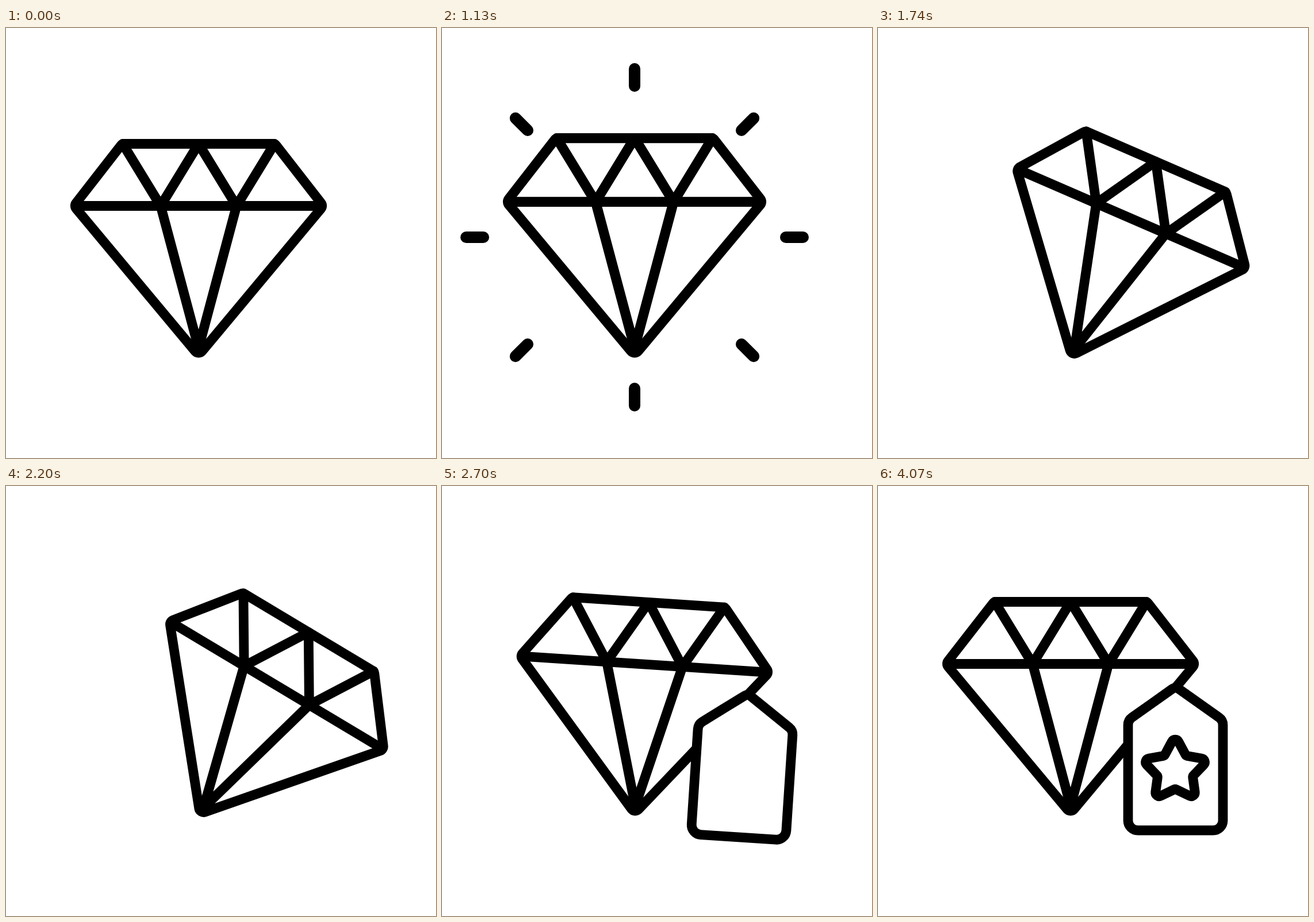
These frames come from a looping animation (748 by 748 pixels, 7600 ms). An HTML page with a canvas:

```html
<!DOCTYPE html>
<html lang="en">
<head>
<meta charset="utf-8">
<title>Diamond and tag</title>
<style>
  html, body { margin: 0; height: 100%; overflow: hidden; background: #fff; }
  canvas { display: block; width: 100vw; height: 100vh; }
</style>
</head>
<body>
<canvas width="748" height="748"></canvas>
<script>
const ctx = document.querySelector('canvas').getContext('2d');
const LOOP = 7600, FPS = 30, LINE = 16.8;
const PIVOT = [335, 574];
const SPARK_CENTER = [335, 364];
const SPARK_OFFSETS = [4, 4, -4, 0, -10, 2, 1, -2]; // clockwise from the right
const STAR_CENTER = [517, 495];

const clamp = x => Math.min(1, Math.max(0, x));
const progress = (t, start, end) => clamp((t - start) / (end - start));

// Steep ease in and out: cubic-bezier(.84, 0, .15, 1)
function ease(x) {
  let low = 0, high = 1;
  for (let i = 0; i < 24; i++) {
    const u = (low + high) / 2, v = 1 - u;
    if (3 * u * v * v * 0.84 + 3 * u * u * v * 0.15 + u ** 3 < x) low = u;
    else high = u;
  }
  return low * low * (3 - 2 * low);
}
const eased = (t, start, end) => ease(progress(t, start, end));

// Closed polygon from [x, y, corner radius] points
function roundedPolygon(points) {
  const [first, last] = [points[0], points.at(-1)];
  ctx.beginPath();
  ctx.moveTo((first[0] + last[0]) / 2, (first[1] + last[1]) / 2);
  points.forEach(([x, y, r], i) => {
    const next = points[(i + 1) % points.length];
    const end = i === points.length - 1
      ? [(x + next[0]) / 2, (y + next[1]) / 2] : next;
    ctx.arcTo(x, y, end[0], end[1], r);
  });
  ctx.closePath();
}

function polyline(...points) {
  ctx.beginPath();
  points.forEach(([x, y]) => ctx.lineTo(x, y));
  ctx.stroke();
}

function drawDiamond() {
  const top = 201.5, girdle = 309.5;
  roundedPolygon([
    [202, top, 8], [468, top, 8], [552, girdle, 8], [335, 569.5, 8], [118, girdle, 8]
  ]);
  ctx.stroke();
  polyline([121, girdle], [549, girdle]);
  polyline([203, top], [269, girdle], [335, top], [401, girdle], [467, top]);
  polyline([269, girdle], [335, 557], [401, girdle]);
}

function drawTag() {
  roundedPolygon([
    [517.5, 349, 9], [600, 407.5, 16], [600, 599, 17], [435, 599, 17], [435, 407.5, 16]
  ]);
  ctx.fill();
  ctx.stroke();
}

function drawStar(t) {
  const p = progress(t, 3567, 4067);
  if (!p) return;
  const size = 1 - (1 - clamp(p / 0.6)) ** 3;
  const hop = -7 * Math.sin(Math.PI * p);
  const points = Array.from({ length: 10 }, (_, i) => {
    const angle = (i / 5 - 0.5) * Math.PI, tip = i % 2 === 0;
    const radius = tip ? 61 : 32;
    return [radius * Math.cos(angle), radius * Math.sin(angle), tip ? 6.5 : 4];
  });
  ctx.save();
  ctx.translate(STAR_CENTER[0], STAR_CENTER[1] + hop);
  ctx.scale(size, size);
  roundedPolygon(points);
  ctx.stroke();
  ctx.restore();
}

// Each ray is wiped in, then wiped out, from the inside outwards
function drawSparks(t) {
  const edge = p => 244 + 72 * p;
  const outer = edge(eased(t, 500, 1333));
  const inner = edge(eased(t, 1030, 1730));
  if (outer - inner < 0.01) return;
  SPARK_OFFSETS.forEach((offset, i) => {
    ctx.save();
    ctx.translate(...SPARK_CENTER);
    ctx.rotate(i * Math.PI / 4);
    ctx.beginPath();
    ctx.rect(inner + offset, -12, outer - inner, 24);
    ctx.clip();
    ctx.lineWidth = 20;
    polyline([263, 0], [293, 0]);
    ctx.restore();
  });
}

function draw(t) {
  ctx.fillStyle = '#fff';
  ctx.strokeStyle = '#000';
  ctx.lineWidth = LINE;
  ctx.lineCap = ctx.lineJoin = 'round';
  ctx.fillRect(0, 0, 748, 748);
  drawSparks(t);

  const scale = 1 + 0.0277 * (eased(t, 500, 1333) - eased(t, 1333, 1733));
  const degrees = 31.2 * (eased(t, 1333, 2056) - eased(t, 2067, 3067));
  ctx.save();
  ctx.translate(...PIVOT);
  ctx.rotate(degrees * Math.PI / 180);
  ctx.scale(scale, scale);
  ctx.translate(-PIVOT[0], -PIVOT[1]);
  drawDiamond();
  if (t >= 2580) drawTag();
  drawStar(t);
  ctx.restore();
}

function tick() {
  const t = performance.now() % LOOP;
  draw(Math.floor((t + 5) * FPS / 1000) * 1000 / FPS);
  requestAnimationFrame(tick);
}
tick();
</script>
</body>
</html>
```
